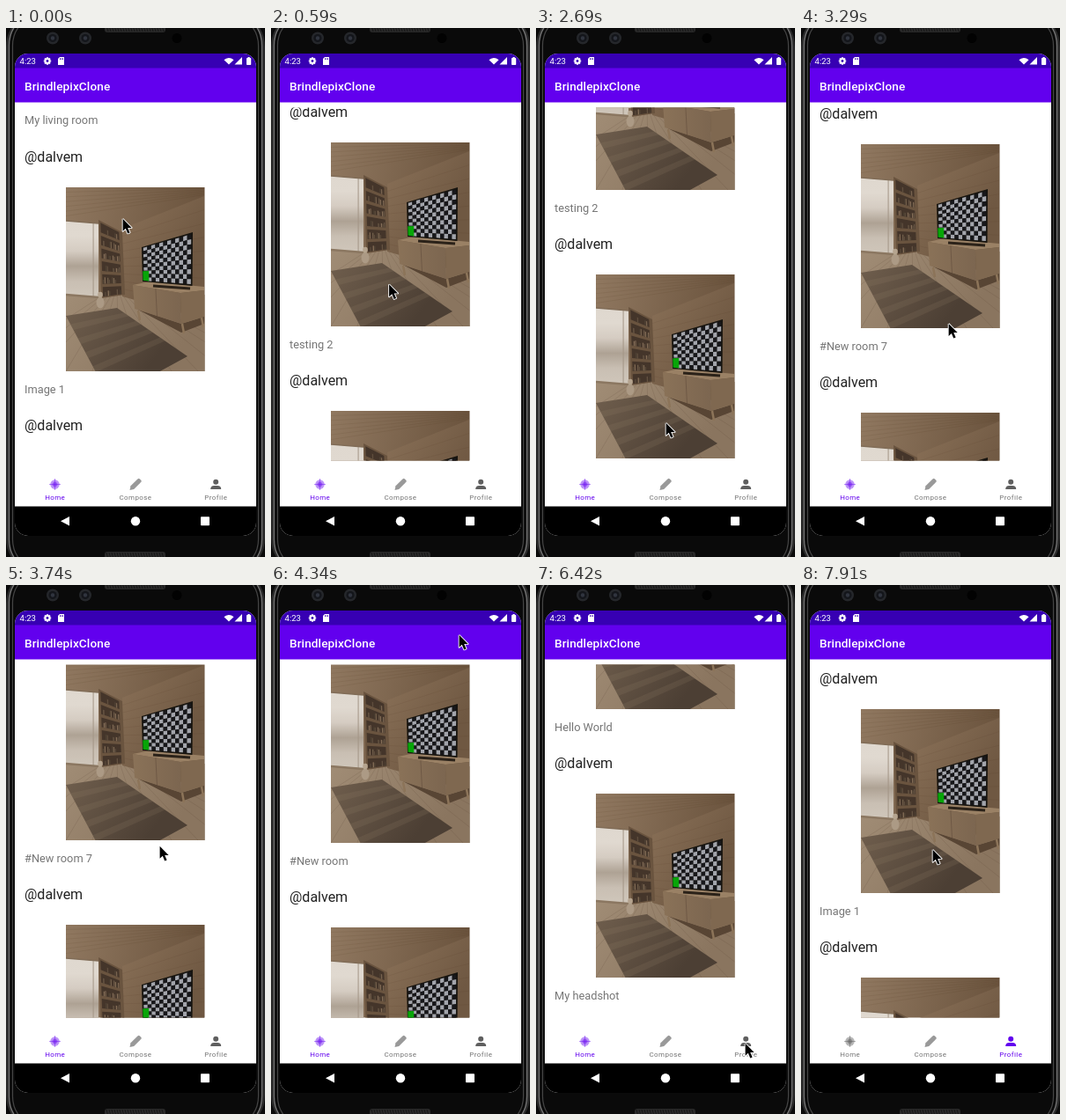
These frames come from a looping animation (294 px wide and 601 px high, 8000 ms). An HTML page with a canvas:

```html
<!DOCTYPE html>
<html lang="en">
<head>
<meta charset="utf-8">
<title>Phone feed</title>
<style>
html, body { margin: 0; width: 100%; height: 100%; overflow: hidden; background: #0a0a0a; }
canvas { display: block; width: 294px; height: 601px; }
</style>
</head>
<body>
<canvas id="stage" width="294" height="601"></canvas>
<script>
const ctx = document.getElementById('stage').getContext('2d');
const LOOP = 8000, STEP = 150, PERIOD = 305.5;
const PURPLE = '#6200ee', FONT = 'Roboto, Arial, sans-serif';
const USER = '@dalvem';
const FEED = ['My living room', 'Image 1', 'testing 2', '#New room 7', '#New room', 'Hello World', 'My headshot'];
const PROFILE = ['Image 1', 'My living room'];

// Gestures: time, pointer x, pointer y, list scroll.
const KEYS = [
  [0, 132, 216, 0],
  [1040, 134, 317, 482.5],
  [1340, 134, 317, 482.5],
  [2690, 147, 448, 511.5],
  [3740, 174, 296, 711],
  [4340, 213, 56, 1013.5],
  [5520, 253, 469, 1471],
  [6420, 237, 520, 1471],
  [6870, 237, 520, 1471],
  [7460, 131, 270, 1471],
  [7910, 149, 300, 1471]
];

function snap(t) {
  const origin = [140, 5520, 7460].filter(o => o <= t).pop();
  return origin ? origin + Math.floor((t - origin) / STEP) * STEP : 0;
}

function pose(t) {
  const i = KEYS.findIndex(k => k[0] > t);
  if (i < 0) return KEYS[KEYS.length - 1];
  const a = KEYS[i - 1], b = KEYS[i];
  const u = 1 - Math.pow(1 - (t - a[0]) / (b[0] - a[0]), 1.6);
  return a.map((v, j) => v + (b[j] - v) * u);
}

function box(c, x, y, w, h, r = 0) {
  ctx.fillStyle = c;
  ctx.beginPath();
  ctx.roundRect(x, y, w, h, r);
  ctx.fill();
}

function frame(c, w, inset, over, r) {
  ctx.strokeStyle = c;
  ctx.lineWidth = w;
  ctx.beginPath();
  ctx.roundRect(inset, -over, 294 - 2 * inset, 601 + 2 * over, r);
  ctx.stroke();
}

function oval(c, x, y, rx, ry = rx) {
  ctx.fillStyle = c;
  ctx.beginPath();
  ctx.ellipse(x, y, rx, ry, 0, 0, Math.PI * 2);
  ctx.fill();
}

function path(pts) {
  ctx.beginPath();
  for (let i = 0; i < pts.length; i += 2) ctx.lineTo(pts[i], pts[i + 1]);
}

function poly(c, ...pts) {
  ctx.fillStyle = c;
  path(pts);
  ctx.fill();
}

function line(c, w, ...pts) {
  ctx.strokeStyle = c;
  ctx.lineWidth = w;
  path(pts);
  ctx.stroke();
}

function grad(x0, y0, x1, y1, ...colors) {
  const g = ctx.createLinearGradient(x0, y0, x1, y1);
  colors.forEach((c, i) => g.addColorStop(i / (colors.length - 1), c));
  return g;
}

function text(s, x, y, size, color, { weight = 400, align = 'left', gap = 0 } = {}) {
  ctx.font = `${weight} ${size}px ${FONT}`;
  ctx.letterSpacing = gap + 'px';
  ctx.textAlign = align;
  ctx.fillStyle = color;
  ctx.fillText(s, x, y);
}

// A flat face in perspective: its top and bottom edges, left to right.
function plane(x0, y0, x1, y1, x2, y2, x3, y3) {
  const mix = (a, b, u) => a + (b - a) * u;
  return (u, v) => [mix(mix(x0, x1, u), mix(x2, x3, u), v), mix(mix(y0, y1, u), mix(y2, y3, u), v)];
}

function face(p, c, u0 = 0, v0 = 0, u1 = 1, v1 = 1) {
  poly(c, ...p(u0, v0), ...p(u1, v0), ...p(u1, v1), ...p(u0, v1));
}

function grain(p, n, c, w = 0.7) {
  for (let i = 1; i < n; i++) line(c, w, ...p(0, i / n), ...p(1, i / n));
}

function random(seed) {
  return () => (seed = seed * 16807 % 2147483647) / 2147483647;
}

const ceiling = plane(0, 0, 157, 0, 0, 38, 157, 10);
const wall = plane(64, 47, 157, 10, 64, 124, 157, 150);
const pane = plane(0, 38, 37, 41, 0, 122, 37, 125);
const shelf = plane(37, 37, 64, 51, 40, 126, 67, 122);
const rug = plane(0, 146, 58, 137, 50, 240, 138, 192);
const front = plane(76, 111, 130, 120, 78, 138, 131, 155);
const side = plane(130, 120, 157, 117, 131, 155, 157, 147);
const screen = plane(86, 68, 144, 51, 87, 107, 143.5, 112);

function bookcase() {
  const rand = random(11), rows = 6, books = 12;
  face(shelf, '#6a543f');
  for (let r = 0; r < rows; r++) {
    face(shelf, '#44352a', 0.08, (r + 0.15) / rows, 0.86, (r + 0.9) / rows);
    for (let b = 0; b < books; b++) {
      if (rand() < 0.5) continue;
      const u = 0.1 + b * 0.75 / books, tone = 70 + 60 * rand();
      face(shelf, `rgb(${tone},${tone * 0.83},${tone * 0.66})`, u, (r + 0.35 + 0.25 * rand()) / rows, u + 0.05, (r + 0.9) / rows);
    }
  }
}

function tv() {
  const cols = 12, rows = 10, at = (i, n) => 0.03 + 0.94 * i / n;
  line('#2b2219', 3, 99, 112, 141, 115);
  face(screen, '#17140f');
  for (let i = 0; i < cols; i++) for (let j = 0; j < rows; j++) {
    face(screen, (i + j) % 2 ? '#17171a' : '#a2a4ab', at(i, cols), at(j, rows), at(i + 1, cols), at(j + 1, rows));
  }
  face(screen, '#08a508', 0.01, 0.7, 0.13, 0.97);
}

function cabinet() {
  poly('#584534', 80, 138, 131, 155, 157, 147, 157, 155, 131, 165);
  for (const [x, y] of [[82, 140], [132, 155], [154, 148]]) line('#8c7459', 2.5, x, y, x + 2, y + 11);
  poly('#9a8165', 76, 111, 95, 107, 157, 113, 157, 117, 130, 120);
  face(front, grad(76, 0, 130, 0, '#8a7258', '#7c6650'));
  face(side, '#7f6850');
  line('#665140', 0.7, ...front(0.48, 0), ...front(0.48, 1));
}

function cat() {
  oval('#ac9a85', 39, 131, 4.5, 6.5);
  oval('#b5a48f', 39, 122, 2.8, 3.2);
}

function room(y) {
  ctx.save();
  ctx.translate(68, y);
  ctx.beginPath();
  ctx.rect(0, 0, 157.5, 209);
  ctx.clip();
  box(grad(0, 0, 157, 30, '#907860', '#6a533d'), 0, 0, 158, 209);
  grain(ceiling, 7, 'rgba(60,40,22,.12)');
  // floor boards fan out from the far corner
  box(grad(0, 124, 110, 209, '#a08c75', '#8a755f'), 0, 122, 158, 87);
  for (let i = 0; i < 12; i++) line('rgba(75,55,38,.2)', 0.7, 58, 112, i * 30 - 90, 209);
  face(wall, grad(68, 0, 157, 60, '#8b7259', '#6f5842'));
  grain(wall, 9, 'rgba(55,38,20,.1)');
  // window with misty trees
  face(pane, grad(0, 38, 0, 124, '#dfd8cf', '#e0d9d0', '#d5ccc2', '#aea294', '#c9bfb3', '#cfc6ba'));
  line('#a39585', 1, ...pane(0.84, 0), ...pane(0.84, 1));
  line('#806c57', 1.5, ...pane(0, 0), ...pane(1, 0));
  line('#8b7761', 2.5, ...pane(0, 1), ...pane(1, 1));
  bookcase();
  // rug with light falling across it
  face(rug, grad(0, 140, 90, 209, '#6f5e4d', '#4c3f34'));
  for (let i = 0; i < 4; i++) face(rug, 'rgba(150,130,108,.16)', 0, 0.1 + i * 0.17, 1, 0.17 + i * 0.17);
  cabinet();
  tv();
  cat();
  ctx.restore();
}

function feed(captions, y0) {
  ctx.save();
  ctx.beginPath();
  ctx.rect(15, 90.5, 264, 401);
  ctx.clip();
  captions.forEach((s, i) => {
    const y = Math.floor(y0 + i * PERIOD), top = y - 230;
    text(USER, 21, y - 259, 16, '#212121');
    if (top > -120 && top < 485) room(top);
    text(s, 21, y + 4, 12.8, '#757575');
  });
  ctx.restore();
}

function phone() {
  box('#0a0a0a', 0, 0, 294, 601);
  frame('#2c2c2c', 3, 1.5, 20, 42);
  frame('#777', 1.3, 3.5, 20, 40);
  frame('#454545', 1.2, 7.5, 16, 36);
  for (const y of [-4, 595]) {
    box('#292929', 112, y, 69, 9, 3);
    for (let x = 114; x < 180; x += 3) line('#161616', 1, x, y + 1, x + 2, y + 8);
  }
  for (const x of [53, 90]) {
    ['#25272b', '#14161b', '#30343e'].forEach((c, i) => oval(c, x, 11.5, 7 - i * 2.4));
  }
  oval('#020202', 194, 11.5, 5.5);
}

function statusBar() {
  box('#3700b3', 10, 29, 274, 17);
  text('4:23', 15.5, 41, 9.6, '#fff');
  ctx.save();
  ctx.translate(47, 37.5);
  for (let i = 0; i < 4; i++) {
    box('#fff', -4.2, -1.1, 8.4, 2.2);
    ctx.rotate(Math.PI / 4);
  }
  ctx.restore();
  oval('#fff', 47, 37.5, 3.2);
  oval('#3700b3', 47, 37.5, 1.4);
  poly('#fff', 61, 33, 66, 33, 66, 42, 59, 42, 59, 35);
  for (let i = 0; i < 3; i++) box('#3700b3', 61 + i * 1.6, 34.3, 0.8, 1.8);
  ctx.fillStyle = '#fff';
  ctx.beginPath();
  ctx.moveTo(253, 41.5);
  ctx.arc(253, 41.5, 7.6, -Math.PI * 0.76, -Math.PI * 0.24);
  ctx.fill();
  poly('#fff', 268, 33, 268, 41.5, 259.5, 41.5);
  box('#fff', 273, 34, 5.2, 8, 0.8);
  box('#fff', 274.5, 33, 2.2, 2);
}

function homeIcon(c) {
  ctx.save();
  ctx.translate(55.5, 518.5);
  ctx.globalAlpha = 0.42;
  oval(c, 0, 0, 5.2);
  line(c, 1.2, 0, -6.5, 0, 6.5);
  line(c, 1.2, -6.5, 0, 6.5, 0);
  oval(c, 0, 0, 2.8);
  ctx.restore();
}

function pencilIcon() {
  ctx.save();
  ctx.translate(140.5, 525);
  ctx.rotate(-Math.PI / 4);
  poly('#999', 0, 0, 4, -2.6, 14, -2.6, 14, 2.6, 4, 2.6);
  box('#999', 13, -2.6, 4, 5.2, 1.5);
  ctx.restore();
}

function personIcon(c) {
  oval(c, 238.2, 515.8, 3);
  box(c, 232.2, 520, 12, 4, [4, 4, 0, 0]);
}

function tabs(active) {
  const tint = (i, rest) => active === i ? PURPLE : rest;
  homeIcon(tint(0, '#555'));
  pencilIcon();
  personIcon(tint(2, '#5f5f5f'));
  ['Home', 'Compose', 'Profile'].forEach((s, i) =>
    text(s, 55.7 + i * 91.3, 536.2, 8, tint(i, '#757575'), { align: 'center', gap: 0.4 }));
}

function systemBar() {
  box('#000', 10, 543.5, 274, 34);
  poly('#fff', 62, 560.3, 72, 555, 72, 565.6);
  oval('#fff', 147, 560.3, 5.2);
  box('#fff', 221, 555.3, 10, 10, 0.8);
}

function pointer(x, y) {
  ctx.save();
  ctx.translate(x, y);
  ctx.lineJoin = 'round';
  const arrow = [0.6, 0.8, 0.6, 14.8, 3.8, 11.8, 6.2, 17.4, 8.6, 16.4, 6.2, 10.9, 10.6, 10.9, 0.6, 0.8];
  line('#fff', 1.8, ...arrow);
  poly('#000', ...arrow);
  ctx.restore();
}

function draw(t) {
  const [, x, y, scroll] = pose(t);
  phone();
  ctx.save();
  ctx.beginPath();
  ctx.roundRect(10, 29, 274, 548, 15);
  ctx.clip();
  box('#fff', 10, 29, 274, 548);
  statusBar();
  box(PURPLE, 10, 45.5, 274, 39);
  text('BrindlepixClone', 21, 71, 13.6, '#fff', { weight: 500, gap: 0.1 });
  if (t < 6870) feed(FEED, 105.5 - scroll);
  else if (t >= 7170) feed(PROFILE, 371);
  tabs(t < 6720 ? 0 : 2);
  systemBar();
  ctx.restore();
  pointer(x, y);
}

const start = performance.now();
function tick() {
  draw(snap((performance.now() - start) % LOOP));
  requestAnimationFrame(tick);
}
tick();
</script>
</body>
</html>
```
